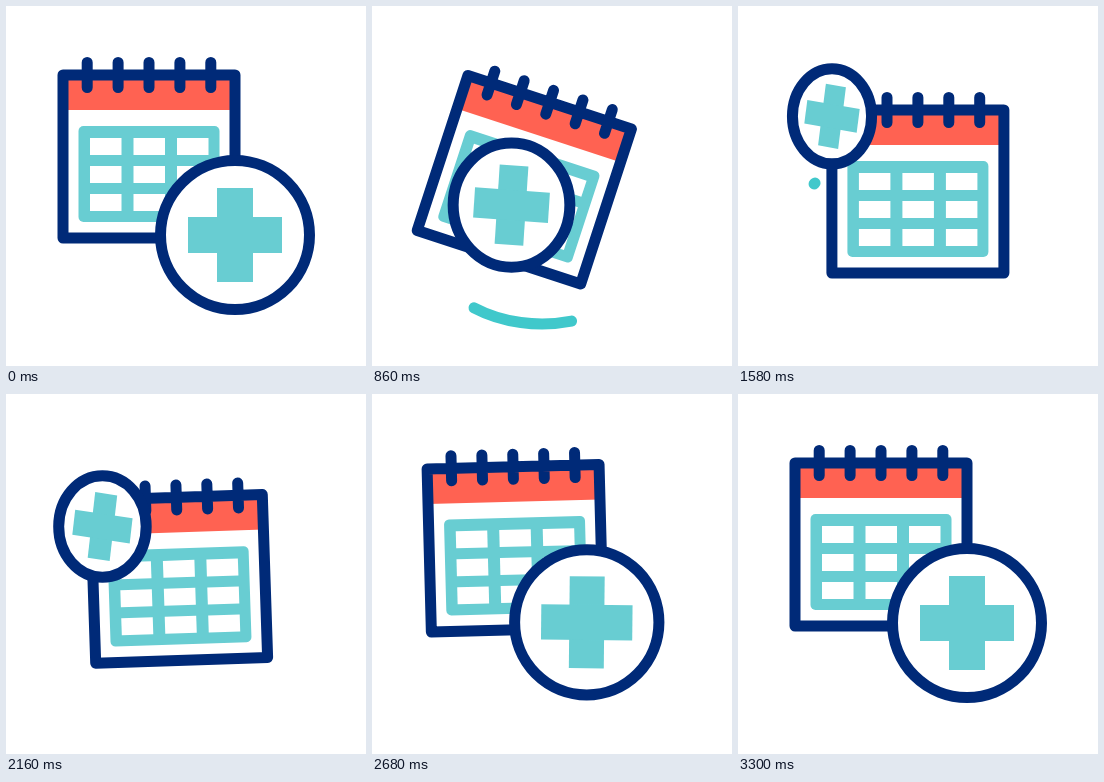
Animation of 360 by 360 pixels, one loop 3.32 s. Source, as an HTML page with a canvas:

```html
<!DOCTYPE html>
<html>
<head>
<meta charset="utf-8">
<title>Medical calendar</title>
<style>
html, body { margin: 0; width: 100%; height: 100%; overflow: hidden; background: #fff; }
canvas { display: block; width: 360px; height: 360px; }
</style>
</head>
<body>
<canvas id="stage" width="360" height="360"></canvas>
<script>
const LOOP = 3320, RAD = Math.PI / 180;
const NAVY = '#002a78', TEAL = '#68cdd2', TRAIL = '#40c8cb', RED = '#ff6252';
const c = document.getElementById('stage').getContext('2d');
c.lineCap = c.lineJoin = 'round';

const clamp = u => Math.min(1, Math.max(0, u));
const smooth = u => u * u * (3 - 2 * u);

// cubic-bezier(.8, 0, 0, 1) running from start for dur milliseconds
function ease(t, start, dur) {
  const u = clamp((t - start) / dur);
  let lo = 0, hi = 1;
  for (let i = 0; i < 24; i++) {
    const m = (lo + hi) / 2;
    if (2.4 * m * (1 - m) ** 2 + m ** 3 < u) lo = m; else hi = m;
  }
  return smooth((lo + hi) / 2);
}

function stroke(color, width) {
  c.strokeStyle = color;
  c.lineWidth = width;
  c.stroke();
}

function box(color, x, y, w, h) {
  c.fillStyle = color;
  c.fillRect(x, y, w, h);
}

function drawTrail(t, swing) {
  if (t < 300 || t > 1630) return;
  const tail = ease(t, 352, 1410);
  const angle = p => (46 + 172 * p) * RAD;
  c.beginPath();
  c.ellipse(170, 230.5, 117.5, 87.4, 0, angle(tail), angle(Math.max(swing, tail)));
  stroke(TRAIL, 11);
}

function drawCalendar(x, y, tilt) {
  c.save();
  c.translate(x, y);
  c.rotate(tilt * RAD);
  box('#fff', -86, -81.5, 172, 163);
  box(RED, -86, -81.5, 172, 35);

  c.fillStyle = TEAL;
  c.beginPath();
  c.roundRect(-70.5, -30.5, 141, 96, 5);
  c.fill();
  for (let row = 0; row < 3; row++)
    for (let col = 0; col < 3; col++)
      box('#fff', -59 + col * 43.5, -18.5 + row * 28, 31.5, 17);

  c.beginPath();
  c.rect(-86, -81.5, 172, 163);
  for (let i = -2; i <= 2; i++) {
    c.moveTo(i * 30.9, -94);
    c.lineTo(i * 30.9, -69);
  }
  stroke(NAVY, 11);
  c.restore();
}

function drawBadge(x, y, rx, ry, tilt) {
  c.beginPath();
  c.ellipse(x, y, rx - 5.5, ry - 5.5, 0, 0, 2 * Math.PI);
  c.fillStyle = '#fff';
  c.fill();
  stroke(NAVY, 11);

  c.save();
  c.translate(x, y);
  c.scale(rx / 80, ry / 80);
  c.rotate(tilt * RAD);
  box(TEAL, -18, -47, 36, 94);
  box(TEAL, -47, -18, 94, 36);
  c.restore();
}

function draw(t) {
  const out = ease(t, 267, 1410);
  const s = out - ease(t, 1620, 1640);
  const sin = Math.sin(s * Math.PI / 2), cos = Math.cos(s * Math.PI / 2);
  const tilt = 19 * (ease(t, 265, 772) - ease(t, 736, 690))
    - 4.5 * smooth(clamp((t - 2010) / 340)) * (1 - clamp((t - 2300) / 900)) ** 2;

  box('#fff', 0, 0, 360, 360);
  drawTrail(t, out);
  drawCalendar(180 - 37 * cos, 150.5 + 35 * sin, tilt);
  drawBadge(229 - 135 * sin, 110 + 119 * cos, 80 - 35 * s, 80 - 27 * s, 8.5 * s);
}

const begin = performance.now();
function tick() {
  draw((performance.now() - begin) % LOOP);
  requestAnimationFrame(tick);
}
tick();
</script>
</body>
</html>
```
